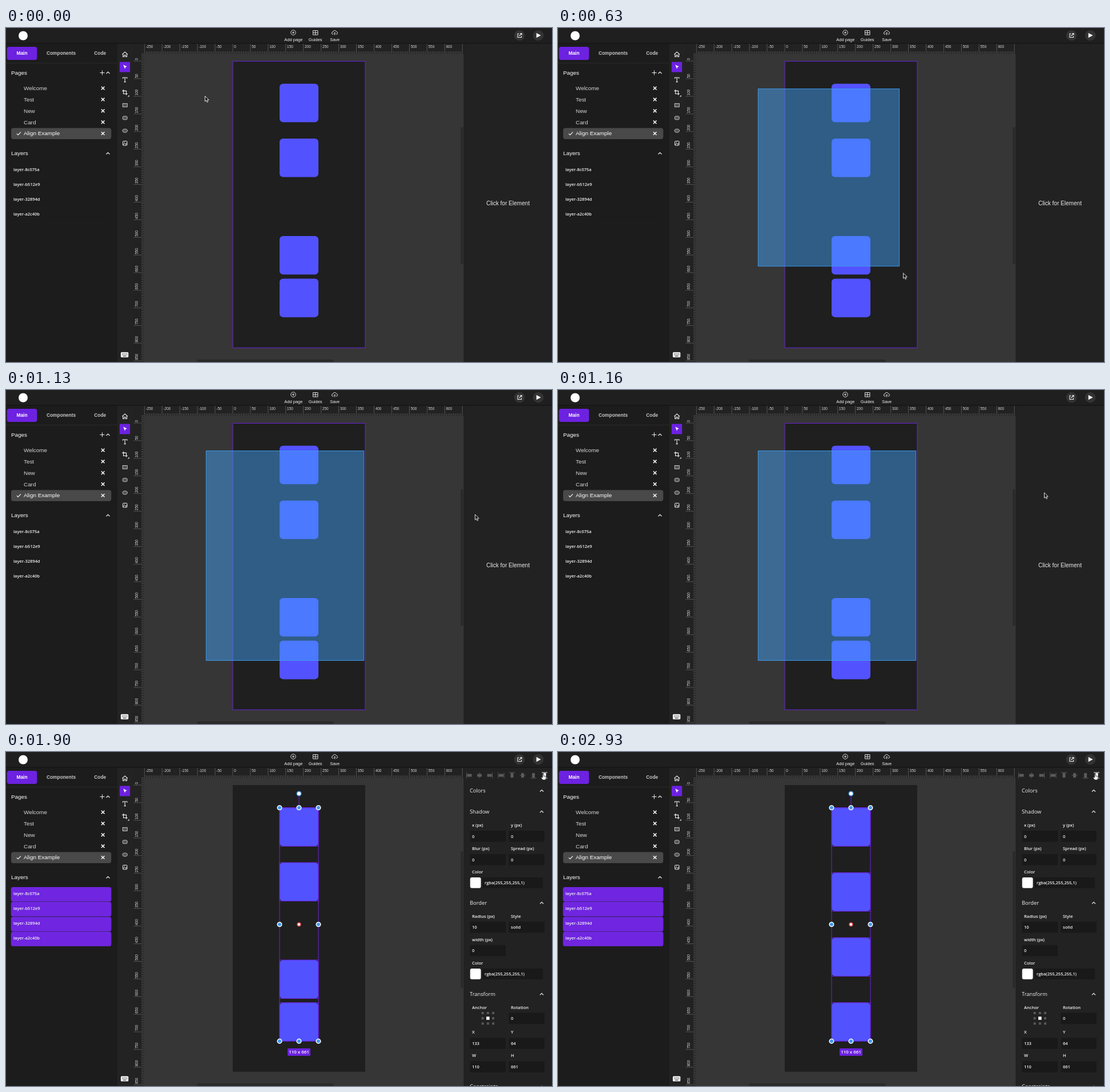
These frames come from a looping animation (956 px wide and 586 px high, 2.96 s). An HTML page:

```html
<!DOCTYPE html>
<html lang="en">
<head>
<meta charset="utf-8">
<title>Align example</title>
<style>
html, body { margin: 0; width: 100%; height: 100%; overflow: hidden; background: #1c1c1c; }
svg { display: block; position: absolute; left: 0; top: 0; }
text { fill: #f2f2f2; font-family: "Liberation Sans", Arial, sans-serif; }
.tab { font-size: 8.4px; font-weight: 700; text-anchor: middle; fill: #c4c4c4; }
.tab.on { fill: #fff; }
.bar { font-size: 7.5px; text-anchor: middle; }
.item { font-size: 9.9px; fill: #d6d6d6; }
.item.on { fill: #fff; }
.note { font-size: 10.05px; fill: #ececec; }
.head { font-size: 9.9px; fill: #fff; }
.small { font: 600 7.5px "Open Sans", "Noto Sans", sans-serif; }
.title { font: 500 9.3px "Open Sans", "Noto Sans", sans-serif; }
.size { font: 600 7.9px "Open Sans", "Noto Sans", sans-serif; text-anchor: middle; fill: #fff; }
.num { font-size: 6.4px; fill: #d8d8d8; }
.line { fill: none; stroke: #f0f0f0; stroke-width: 1; }
.bold { fill: none; stroke: #f6f6f6; stroke-width: 1.5; }
.edge { fill: none; stroke: #6b22dc; stroke-width: 1; }

.idle, .picked, .moved, .unmoved, .hover, .lit {
  animation: 2960ms step-end infinite;
}
.idle { animation-name: idle; }
.picked { animation-name: picked; }
.unmoved { animation-name: unmoved; }
.moved { animation-name: moved; }
.hover { animation-name: hover; }
.lit { animation-name: lit; }
.box {
  fill: rgba(68, 167, 255, .464); stroke: #3f9bec;
  animation: drag 2960ms linear infinite, shown 2960ms step-end infinite;
}
.arrow { animation: point 2960ms linear infinite, arrowOn 2960ms step-end infinite; }
.hand { animation: press 2960ms linear infinite, handOn 2960ms step-end infinite; }

@keyframes idle { 0% { opacity: 1 } 39.36%, 100% { opacity: 0 } }
@keyframes picked { 0% { opacity: 0 } 39.36%, 100% { opacity: 1 } }
@keyframes unmoved { 0% { opacity: 1 } 67.57%, 100% { opacity: 0 } }
@keyframes moved { 0% { opacity: 0 } 67.57%, 100% { opacity: 1 } }
@keyframes hover { 0% { opacity: 0 } 13.51% { opacity: 1 } 17.23%, 100% { opacity: 0 } }
@keyframes lit { 0% { opacity: 0 } 60.81%, 100% { opacity: 1 } }
@keyframes shown { 0% { opacity: 0 } 8.45% { opacity: 1 } 39.36%, 100% { opacity: 0 } }
@keyframes arrowOn { 0% { opacity: 1 } 43.58%, 100% { opacity: 0 } }
@keyframes handOn { 0% { opacity: 0 } 43.58%, 100% { opacity: 1 } }
@keyframes drag {
  0%, 8.45% { width: 0; height: 0 }
  15.54% { width: 133px; height: 147px }
  17.91% { width: 196px; height: 232px }
  21.28% { width: 247px; height: 310.5px }
  23.65% { width: 264px; height: 346px }
  26.35%, 100% { width: 276.3px; height: 367.7px }
}
@keyframes point {
  0%, 2.03% { transform: translate(347.9px, 119px) }
  5.41%, 7.09% { transform: translate(350px, 107px) }
  12.16% { transform: translate(470px, 240px) }
  15.54% { transform: translate(532.9px, 320px) }
  17.91% { transform: translate(569px, 371px) }
  21.28% { transform: translate(603.9px, 429px) }
  23.65% { transform: translate(618px, 458px) }
  25.68%, 31.08% { transform: translate(626px, 474px) }
  33.78% { transform: translate(655px, 440px) }
  35.81% { transform: translate(701px, 380px) }
  38.18% { transform: translate(819.9px, 219px) }
  40.54% { transform: translate(890px, 130px) }
  43.58%, 100% { transform: translate(934px, 73px) }
}
@keyframes press {
  0%, 54.73% { transform: translate(934.5px, 72.5px) }
  62.5%, 100% { transform: translate(940.5px, 38px) }
}
</style>
</head>
<body>
<svg id="stage" width="956" height="586" viewBox="0 0 956 586"></svg>
<script>
const UNIT = 232 / 375, PAGE_X = 397, PAGE_Y = 58;
const PURPLE = '#6c22e0';
const range = n => [...Array(n).keys()];
const each = (list, fn) => list.map(fn).join('');

const rect = (x, y, w, h, fill, r = 0, more = '') =>
  `<rect x="${x}" y="${y}" width="${w}" height="${h}" rx="${r}" fill="${fill}" ${more}/>`;
const circle = (x, y, r, fill, more = '') =>
  `<circle cx="${x}" cy="${y}" r="${r}" fill="${fill}" ${more}/>`;
const path = (d, cls = 'line', more = '') => `<path d="${d}" class="${cls}" ${more}/>`;
const shape = (d, fill, more = '') => `<path d="${d}" fill="${fill}" ${more}/>`;
const text = (x, y, s, cls) => `<text x="${x}" y="${y}" class="${cls}">${s}</text>`;
const group = (cls, body) => `<g class="${cls}">${body}</g>`;
const chevron = (x, y) => path(`M${x - 3} ${y + 1.5}l3 -3l3 3`, 'line', 'style="stroke-width:1.2"');

function topBar() {
  return rect(0, 0, 956, 27, '#1f1f1f') + rect(0, 26.5, 956, 1, '#111') +
    circle(30, 13.5, 8, '#fff') +
    circle(503, 8, 4.3, 'none', 'stroke="#e8e8e8" stroke-width=".9"') +
    path('M501 8h4M503 6v4', 'line', 'style="stroke-width:.9"') +
    path('M537.5 4.5h8.5v7.5h-8.5zM541.7 4.5v7.5M537.5 8.2h8.5', 'line', 'style="stroke-width:.9"') +
    path('M573.5 11h-1a2 2 0 0 1 -.2 -4a3.3 3.3 0 0 1 6.3 -.5a2.3 2.3 0 0 1 .2 4.5h-1M575.6 12.5v-4.5M574 9.5l1.6 -1.6l1.6 1.6',
      'line', 'style="stroke-width:.9"') +
    text(503.4, 23, 'Add page', 'bar') + text(541.7, 23, 'Guides', 'bar') + text(575.7, 23, 'Save', 'bar') +
    circle(899, 13, 9.3, '#333') +
    path('M898.5 10h-2.5v6.5h6.5v-2.5M900 9.5h3v3M903 9.5l-4.5 4.5', 'line', 'style="stroke-width:1.1"') +
    circle(932, 13, 9.3, '#333') + shape('M928.7 8.7l7.8 4.3l-7.8 4.3z', '#fff');
}

function leftPanel() {
  const pages = ['Welcome', 'Test', 'New', 'Card', 'Align Example'];
  const layers = ['layer-8c075a', 'layer-b512e9', 'layer-32894d', 'layer-a2c40b'];
  const rowY = i => 237 + i * 26.1;
  return rect(0, 27, 195, 559, '#1c1c1c') + rect(0, 61, 195, 1, '#292929') +
    rect(1.7, 33, 52.7, 22.9, PURPLE, 4) +
    text(28, 47.2, 'Main', 'tab on') + text(96.5, 47.2, 'Components', 'tab') + text(164.7, 47.2, 'Code', 'tab') +
    text(9, 81.8, 'Pages', 'head') + path('M164.5 78.5h8M168.5 74.5v8', 'line') + chevron(178.5, 78.5) +
    rect(9, 175.4, 175.3, 19.6, '#494949', 4) +
    each(pages, (name, i) => {
      const y = 105.6 + i * 19.85;
      return text(31, y + 3.4, name, i === 4 ? 'item on' : 'item') +
        path(`M166.9 ${y - 2.8}l5.6 5.6m0 -5.6l-5.6 5.6`, 'bold');
    }) +
    path('M18.8 185.3l2.3 2.4l4.8 -5', 'bold', 'style="stroke-width:1.2"') +
    text(9, 223.3, 'Layers', 'head') + chevron(178.5, 220) +
    each(layers, (_, i) => rect(9, rowY(i) + 25, 175.3, .6, '#202020')) +
    group('picked', each(layers, (_, i) => rect(8.7, rowY(i), 175.7, 25.5, '#7026e0', 3.5))) +
    each(layers, (name, i) => text(13, rowY(i) + 13.8, name, 'small'));
}

function toolBar() {
  return rect(195, 27, 28, 559, '#232323') +
    path('M203.5 46.2l4.7 -4.2l4.7 4.2M204.8 45.5v5h2.2v-3h2.4v3h2.2v-5', 'line', 'style="stroke-width:1.1"') +
    rect(199, 59.6, 18.2, 17.8, PURPLE, 1) +
    shape('M205.3 64.5l6.6 3.2l-2.8 1.1l-1 2.9z', '#fff') +
    path('M204.5 88.7v-1.7h7.5v1.7M208.2 87v7.5M206.6 94.6h3.3', 'line', 'style="stroke-width:1.1"') +
    path('M205.7 108v7.5h7.3M203.3 110.3h7.3v7.5', 'line', 'style="stroke-width:1.2"') +
    shape('M215.8 117.5v3h-3z', '#ddd') +
    rect(204.3, 132.5, 8, 6, '#555', 0, 'stroke="#ddd" stroke-width=".8"') +
    rect(204.3, 154.8, 8, 6, '#555', 2, 'stroke="#ddd" stroke-width=".8"') +
    '<ellipse cx="208.3" cy="180.2" rx="4.2" ry="3" fill="#555" stroke="#ddd" stroke-width=".8"/>' +
    rect(204.6, 198.5, 7.4, 7.4, 'none', 1, 'stroke="#eee"') +
    path('M205 205l2.5 -3l1.7 1.7l2.5 -2.4M206.6 200.5h1.3M209.5 205l2 -1.5', 'line') +
    rect(201, 568.7, 13.3, 9, '#fff', 1.5) +
    path('M203 571.2h9.5M203 573.3h9.5', 'line', 'style="stroke:#222;stroke-dasharray:1.2 .9"') +
    path('M204.6 575.7h6', 'line', 'style="stroke:#222"');
}

function rulers() {
  const tick = i => i % 10 === 0 ? 18 : 4.5;
  const acrossTop = range(181).map(i => i - 50).filter(i => PAGE_X + i * 5 * UNIT < 800);
  const downSide = range(176).map(i => i - 4).filter(i => PAGE_Y + i * 5 * UNIT < 586);
  const ticks = each(acrossTop, i => `M${(PAGE_X + i * 5 * UNIT).toFixed(2)} 45.5v${-tick(i)}`) +
    each(downSide, i => `M241.5 ${(PAGE_Y + i * 5 * UNIT).toFixed(2)}h${-tick(i)}`);
  return rect(223, 27, 579, 18.5, '#222') + rect(223, 27, 18.5, 559, '#222') +
    path(ticks, 'line', 'style="stroke:#777;stroke-width:.6"') +
    each(range(18), i => text(PAGE_X + (i - 5) * 50 * UNIT + 2.3, 35.4, (i - 5) * 50, 'num')) +
    each(range(18), i =>
      `<text class="num" transform="translate(231 ${PAGE_Y + i * 50 * UNIT - 1.5}) rotate(-90)">${i * 50}</text>`) +
    rect(223, 27, 18.5, 18, '#222');
}

const LEFT = 479, TOP = 97.7, WIDE = 68, TALL = 67.6;
const RIGHT = LEFT + WIDE, BOTTOM = 507.4, MID_X = LEFT + WIDE / 2;
const block = y => rect(LEFT, y, WIDE, TALL, '#5352ff', 6.2);
const outline = y => `<rect class="edge" x="${LEFT}" y="${y}" width="${WIDE}" height="${TALL}"/>`;

function canvasArea() {
  const before = [194, 364.9], after = [211.8, 325.8], ends = [TOP, BOTTOM - TALL];
  const knob = (x, y) => circle(x, y, 3.8, '#4099f0', 'stroke="#fff" stroke-width="1.5"');
  return rect(241, 45, 561, 541, '#363636') +
    rect(PAGE_X, PAGE_Y, 232, 503, '#1f1f1f') +
    group('idle', '<rect class="edge" x="397.2" y="58.4" width="231.8" height="502.6"/>') +
    each(ends, block) + group('unmoved', each(before, block)) + group('moved', each(after, block)) +
    group('hover', rect(479, 193.7, 68.5, 68.5, 'none', 0, 'stroke="#6480c8" stroke-width=".8" stroke-dasharray="1.5 1"')) +
    group('picked',
      each(ends, outline) + group('unmoved', each(before, outline)) + group('moved', each(after, outline)) +
      path(`M${LEFT} ${TOP}H${RIGHT}V${BOTTOM}H${LEFT}zM${MID_X} ${TOP}V76`, 'edge') +
      each([LEFT, MID_X, RIGHT], x => knob(x, TOP) + knob(x, BOTTOM)) +
      knob(LEFT, 302.5) + knob(RIGHT, 302.5) +
      circle(MID_X, 73, 3.8, '#fff', 'stroke="#4099f0" stroke-width="1.5"') +
      circle(MID_X, 302.5, 3, '#fff', 'stroke="#e5484d" stroke-width="1.4"') +
      rect(493, 520, 40, 13, PURPLE, 1.5) + text(513, 529.2, '110 x 661', 'size')) +
    rect(796, 174, 4.5, 240, '#2a2a2a', 2) + rect(334, 581.7, 240, 4.3, '#2a2a2a', 2);
}

function alignIcons() {
  const row = (x, bars) => rect(x - 4, 38.5, 8, 5, '#5b5b5b', 1) + each(bars, d => rect(x + d - .5, 36, 1, 10, '#5b5b5b'));
  const col = (x, bars) => rect(x - 2.5, 37, 5, 8, '#5b5b5b', 1) + each(bars, d => rect(x - 5, 41 + d - .5, 10, 1, '#5b5b5b'));
  return row(811.5, [-5]) + row(829, [0]) + row(846.5, [5]) + row(867, [-5, 5]) +
    col(886, [-5]) + col(904.5, [0]) + col(923.5, [5]) + col(943, [-5, 5]) +
    group('lit', rect(940.5, 37, 5, 8, '#fff', 1) + rect(938, 35.5, 10, 1, '#ddd') + rect(938, 45.5, 10, 1, '#ddd'));
}

function rightPanel() {
  const title = (y, s) => text(812, y + 3.3, s, 'title') + chevron(938, y + .5);
  const field = (x, y, label, value) =>
    text(x, y + 2.6, label, 'small') + rect(x - 3.5, y + 9.8, 62.5, 19.4, '#191919', 1) +
    text(x, y + 22.4, value, 'small');
  const pair = (y, a, av, b, bv) => field(816, y, a, av) + field(884, y, b, bv);
  const color = y => text(816, y + 2.6, 'Color', 'small') + rect(812.7, y + 10, 18.8, 18.8, '#fff', 3) +
    rect(834, y + 10, 106, 18.8, '#191919', 1) + text(838, y + 22.2, 'rgba(255,255,255,1)', 'small');
  const anchor = each(range(9), i => i === 4 ? rect(841, 464.3, 5.6, 5.6, '#fff')
    : rect(832.6 + i % 3 * 9.2, 456 + Math.floor(i / 3) * 9.2, 4, 4, '#585858'));
  return rect(802, 27, 154, 559, '#222') + rect(801.5, 27, .7, 559, '#191919') +
    group('idle', text(841, 311.4, 'Click for Element', 'note')) +
    group('picked', alignIcons() +
      title(67.5, 'Colors') + title(104.3, 'Shadow') +
      pair(128.2, 'x (px)', 0, 'y (px)', 0) + pair(169.2, 'Blur (px)', 0, 'Spread (px)', 0) + color(210) +
      title(264.3, 'Border') + pair(288, 'Radius (px)', 10, 'Style', 'solid') +
      field(816, 329, 'width (px)', 0) + color(370) +
      title(424.3, 'Transform') + text(816, 450.5, 'Anchor', 'small') + anchor +
      field(884, 448, 'Rotation', 0) + pair(491.8, 'X', 133, 'Y', 64) + pair(532.8, 'W', 110, 'H', 661) +
      title(587, 'Constraints'));
}

function pointers() {
  const arrow = shape('M.5 .5v9.3l2.2 -2l1.4 3.4l1.6 -.7l-1.4 -3.3h2.9z', '#111', 'stroke="#fff" stroke-width=".9"');
  const hand = shape('M-1 .9q1 -1.4 2 0v3.2l3.3 .7q1.1 .3 1 1.5l-.6 3.2l-.8 1.5h-4.8l-2.4 -3.7q-.6 -1.3 .7 -1.3l1.6 1z',
    '#fff', 'stroke="#111" stroke-width=".8"');
  return '<rect class="box" x="350.4" y="106.8"/>' + group('arrow', arrow) + group('hand', hand);
}

document.getElementById('stage').innerHTML =
  canvasArea() + rulers() + toolBar() + leftPanel() + rightPanel() + topBar() + pointers();
</script>
</body>
</html>
```
